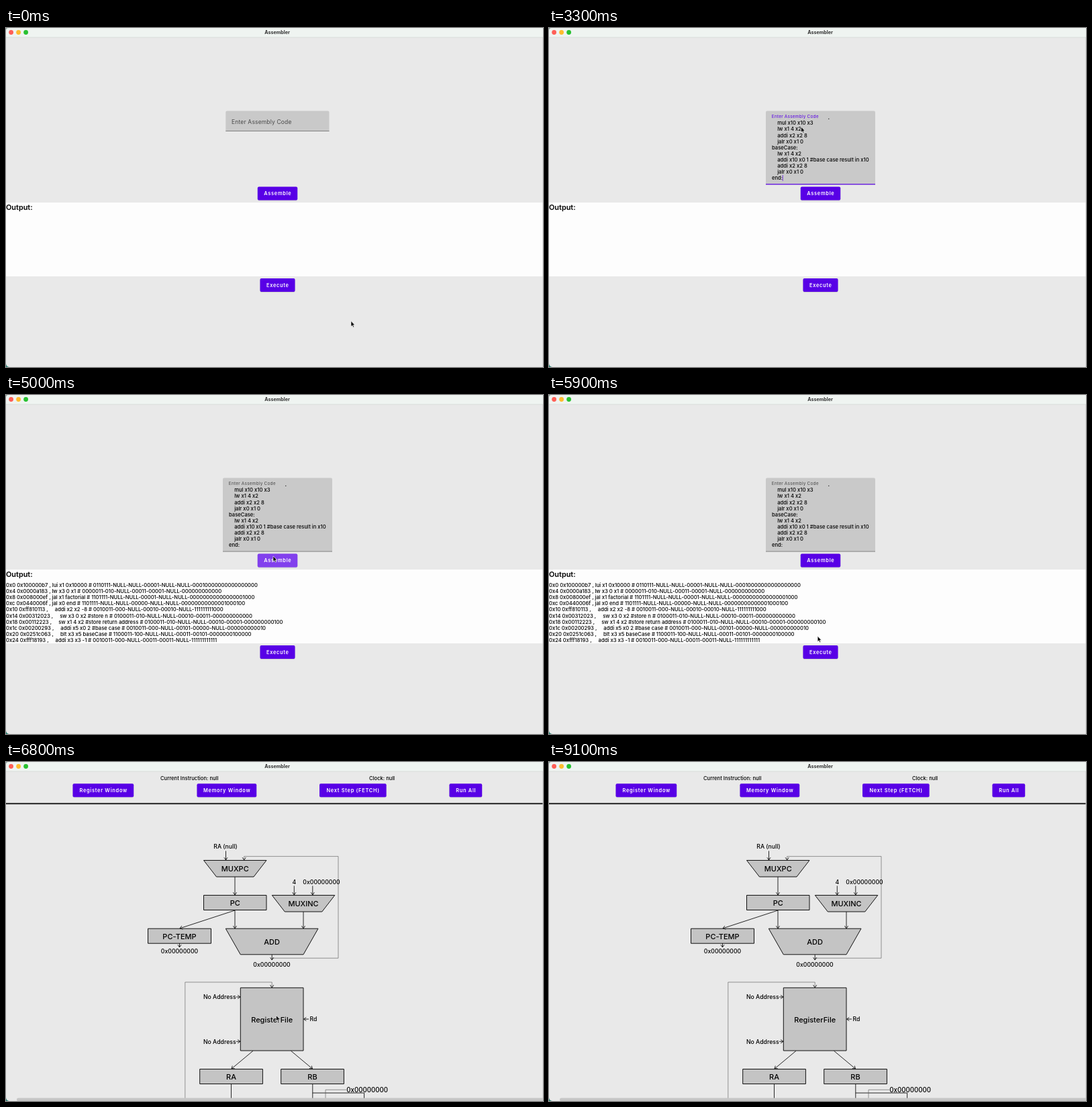
Animation, 800 px wide and 505 px high, one loop 9200 ms. Source, as an HTML page:

```html
<!DOCTYPE html>
<html lang="en">
<head>
<meta charset="utf-8">
<title>Assembler</title>
<style>
  html, body { margin: 0; width: 100%; height: 100%; overflow: hidden; background: #e9e9e9; }
  svg { display: block; width: 800px; height: 505px; }
  text { font-family: Inter, "Open Sans", sans-serif; font-weight: 500; white-space: pre; }
  .mid { text-anchor: middle; }
  .hint { font-weight: 400; }
  .button { font-size: 7.45px; font-weight: 600; letter-spacing: .7px; fill: #fff; }
  .block { fill: #c4c4c4; stroke: #111; stroke-width: 1; }
  .wire { fill: none; stroke: #111; stroke-width: .9; }
  .thin { stroke: #555; stroke-width: .6; }
</style>
</head>
<body>
<svg id="stage" viewBox="0 0 800 505">
  <defs>
    <clipPath id="panelClip"><rect y="260" width="800" height="110"/></clipPath>
    <filter id="shadow" x="-10%" y="-20%" width="120%" height="150%">
      <feDropShadow dx="0" dy=".6" stdDeviation=".7" flood-opacity=".2"/>
    </filter>
  </defs>
  <rect width="800" height="505" fill="#e9e9e9"/>
  <g id="editor"></g>
  <g id="machine"></g>
  <g id="chrome"></g>
  <path id="cursor" d="M0 0V8.1L1.9 6.4L3.2 9.3L4.5 8.7L3.3 5.9H5.7Z"
        fill="#000" stroke="#fff" stroke-width=".6" stroke-linejoin="round"/>
</svg>
<script>
const LOOP = 9200, FRAME = 100;
const PURPLE = '#5900e6';
const FOCUS_AT = 2300, PASTE_AT = 3300, ASSEMBLE_AT = 4700, EXECUTE_AT = 6430;
const $ = id => document.getElementById(id);

function add(parent, tag, attrs = {}, content) {
  const el = document.createElementNS('http://www.w3.org/2000/svg', tag);
  set(el, attrs);
  if (content !== undefined) el.textContent = content;
  parent.appendChild(el);
  return el;
}
function set(el, attrs) {
  for (const key in attrs) el.setAttribute(key, attrs[key]);
}
// Text whose capitals are centred on cy.
function label(parent, content, x, cy, attrs = {}, size = 7.66) {
  return add(parent, 'text', { x, y: cy + size * .36, style: `font-size:${size}px`, ...attrs }, content);
}
function button(parent, content, x, y, width) {
  const shape = { x, y, width, height: 20, rx: 2 };
  add(parent, 'rect', { ...shape, fill: PURPLE, filter: 'url(#shadow)' });
  const glow = add(parent, 'rect', { ...shape, fill: '#fff', opacity: 0 });
  add(parent, 'text', { x: x + width / 2 + .35, y: y + 12.7, class: 'mid button' }, content);
  return glow;
}

// Window frame
const chrome = $('chrome');
add(chrome, 'rect', { width: 800, height: 14, fill: '#eff4f1' });
add(chrome, 'rect', { y: 13.6, width: 800, height: .8, fill: '#d3d6d4' });
['#ff5f57', '#febc2e', '#28c131'].forEach((fill, i) =>
  add(chrome, 'circle', { cx: 7.6 + 11 * i, cy: 6.5, r: 3.4, fill }));
label(chrome, 'Assembler', 404, 6.3, { class: 'mid', style: 'font-size:7.15px;font-weight:700', fill: '#333' });
add(chrome, 'path', { d: 'M0 500Q.5 504.5 5 505H0Z', fill: '#2f8577' });
add(chrome, 'path', { d: 'M0 4Q0 0 4 0H0Z', fill: '#8fa9a2' });
add(chrome, 'rect', { x: 799.4, y: 14, width: .6, height: 491, fill: '#d2d2d2' });

// Editor screen
const editor = $('editor');
const box = add(editor, 'path', { fill: '#c9c9c9' });
const underline = add(editor, 'rect');
const fieldLabel = add(editor, 'text', { class: 'hint' }, 'Enter Assembly Code');
const code = add(editor, 'g');
`    mul x10 x10 x3
    lw x1 4 x2
    addi x2 x2 8
    jalr x0 x1 0
baseCase:
    lw x1 4 x2
    addi x10 x0 1 #base case result in x10
    addi x2 x2 8
    jalr x0 x1 0
end:`.split('\n').forEach((line, i) => label(code, line, 332, 141.6 + 9.1 * i));
add(code, 'rect', { x: 416.3, y: 134.8, width: 1, height: 1.2 });
const caret = add(editor, 'rect', { width: .7, height: 9, fill: PURPLE });

add(editor, 'rect', { y: 260, width: 800, height: 110, fill: '#fdfdfd' });
label(editor, 'Output:', 0, 266.6, { style: 'font-size:10.9px;font-weight:600' }, 11);
const output = add(editor, 'g', { 'clip-path': 'url(#panelClip)' });
`0x0 0x100000b7 , lui x1 0x10000 # 0110111-NULL-NULL-00001-NULL-NULL-00010000000000000000
0x4 0x0000a183 , lw x3 0 x1 # 0000011-010-NULL-00011-00001-NULL-000000000000
0x8 0x008000ef , jal x1 factorial # 1101111-NULL-NULL-00001-NULL-NULL-00000000000000001000
0xc 0x0440006f , jal x0 end # 1101111-NULL-NULL-00000-NULL-NULL-00000000000001000100
0x10 0xff810113 ,     addi x2 x2 -8 # 0010011-000-NULL-00010-00010-NULL-111111111000
0x14 0x00312023 ,     sw x3 0 x2 #store n # 0100011-010-NULL-NULL-00010-00011-000000000000
0x18 0x00112223 ,     sw x1 4 x2 #store return address # 0100011-010-NULL-NULL-00010-00001-000000000100
0x1c 0x00200293 ,     addi x5 x0 2 #base case # 0010011-000-NULL-00101-00000-NULL-000000000010
0x20 0x0251c063 ,     blt x3 x5 baseCase # 1100011-100-NULL-NULL-00011-00101-0000000100000
0x24 0xfff18193 ,     addi x3 x3 -1 # 0010011-000-NULL-00011-00011-NULL-111111111111`
  .split('\n').forEach((line, i) => label(output, line, 0, 283.2 + 9.12 * i));
const assembleGlow = button(editor, 'Assemble', 374.8, 236.5, 59.4);
const executeGlow = button(editor, 'Execute', 378.5, 373.1, 52);

// Data path screen
const machine = $('machine');
label(machine, 'Current Instruction: null', 230, 24.5);
label(machine, 'Clock: null', 541, 24.5);
button(machine, 'Register Window', 99.5, 32.3, 90.7);
button(machine, 'Memory Window', 284.5, 32.3, 88.7);
button(machine, 'Next Step (FETCH)', 467, 32.3, 99.6);
button(machine, 'Run All', 660.5, 32.3, 48.7);
add(machine, 'rect', { y: 60.9, width: 800, height: 2.2, fill: '#333' });

function block(name, x, y, width, height, inset = 0) {
  add(machine, 'path', {
    class: 'block',
    d: `M${x} ${y}h${width}l${-inset} ${height}h${2 * inset - width}Z`
  });
  label(machine, name, x + width / 2, y + height / 2 + .7, { class: 'mid' }, 11);
}
function wire(points, { thin = false, head = true } = {}) {
  const cls = thin ? 'wire thin' : 'wire';
  add(machine, 'path', { class: cls, d: 'M' + points.map(p => p.join(' ')).join('L') });
  if (!head) return;
  const [[ax, ay], [bx, by]] = points.slice(-2);
  const angle = Math.atan2(by - ay, bx - ax);
  const barb = turn => `${bx - 4.6 * Math.cos(angle + turn)} ${by - 4.6 * Math.sin(angle + turn)}`;
  add(machine, 'path', { class: 'wire', d: `M${barb(.6)}L${bx} ${by}L${barb(-.6)}` });
}
block('MUXPC', 294.5, 146.5, 93.5, 24.5, 19);
block('PC', 294.5, 198.5, 93.5, 22);
block('MUXINC', 396.3, 198.5, 93.5, 24.5, 19);
block('PC-TEMP', 211.5, 248.2, 94, 22);
block('ADD', 327.3, 248.2, 137.7, 38.6, 22);
block('RegisterFile', 349.3, 336.3, 93.7, 93.7);
block('RA', 288.7, 457.5, 93.7, 22);
block('RB', 409.7, 457.5, 93.7, 22);

wire([[327.5, 132.5], [327.5, 146]]);
wire([[396, 292.2], [495, 292.2], [495, 140.6], [354.7, 140.6], [354.7, 146]], { thin: true });
wire([[341, 171], [341, 198]]);
wire([[429.3, 184.5], [429.3, 198]]);
wire([[456.8, 184.5], [456.8, 198]]);
wire([[443, 223], [443, 248]]);
wire([[341, 221], [341, 248]]);
wire([[341, 221], [259, 247.8]]);
wire([[258.5, 270], [258.5, 276]]);
wire([[396.2, 287], [396.2, 295]]);
wire([[266.8, 505], [266.8, 328], [396.2, 328], [396.2, 336]], { thin: true });
wire([[343, 350], [349, 350]]);
wire([[343, 416.3], [349, 416.3]]);
wire([[451, 383], [443.5, 383]]);
wire([[368, 430.3], [336, 457]]);
wire([[424.5, 430.3], [456.5, 457]]);
wire([[335.5, 480], [335.5, 505]], { head: false });
wire([[456.8, 480], [456.8, 506.5]]);
wire([[456.8, 493], [533.6, 493], [533.6, 505]], { head: false });
wire([[507, 488.3], [476, 488.3], [476, 506.5]], { thin: true });

[['RA (null)', 327, 126], ['4', 429.3, 178.5], ['0x00000000', 470, 178.5],
 ['0x00000000', 258.5, 282.3], ['0x00000000', 396, 301.7],
 ['No Address', 318.3, 350.3], ['No Address', 318.3, 416.5], ['Rd', 458, 383.3]]
  .forEach(([name, x, y]) => label(machine, name, x, y, { class: 'mid' }, 8.7));
label(machine, '0x00000000', 538.2, 488.3, { class: 'mid' }, 9.7);
add(machine, 'rect', { x: 16, y: 500.4, width: 800, height: 5, rx: 2.3, fill: '#c6c6c6' });

// Motion
const clamp = v => Math.min(1, Math.max(0, v));
const span = (t, from, to) => clamp((t - from) / (to - from));
const smooth = p => p * p * (3 - 2 * p);
const mix = (a, b, p) => a + (b - a) * p;

// Pointer stops: time, x, y
const stops = [
  [500, 514, 436.6], [2100, 375.6, 147.3], [3700, 375.6, 147.3], [4600, 398, 240],
  [5100, 398, 240], [6200, 400.6, 386], [6700, 400.6, 386], [7700, 469, 83.2],
  [8600, 600, 26], [9000, 650, -12]
];
function pointerAt(t) {
  const next = stops.findIndex(s => s[0] > t);
  if (next === 0) return stops[0].slice(1);
  if (next < 0) return stops[stops.length - 1].slice(1);
  const a = stops[next - 1], b = stops[next];
  const p = smooth(span(t, a[0], b[0]));
  return [mix(a[1], b[1], p), mix(a[2], b[2], p)];
}

function drawField(t) {
  const pasted = t >= PASTE_AT;
  const focused = t >= FOCUS_AT && t < ASSEMBLE_AT;
  const lift = smooth(span(t, FOCUS_AT - 50, FOCUS_AT + 150));
  const [x, width, bottom] = pasted ? [323, 163, 233.4] : [327.3, 154.2, 154];
  set(box, { d: `M${x} ${bottom}V125.4q0 -2 2 -2h${width - 4}q2 0 2 2V${bottom}Z` });
  const weight = focused ? 1.2 : .7;
  set(underline, { x, y: bottom - weight, width, height: weight, fill: focused ? PURPLE : '#666' });

  const size = mix(8.5, 6.5, lift);
  set(fieldLabel, {
    x: x + 8.8,
    y: mix(139.6, 131.8, lift) + size * .36,
    fill: focused ? PURPLE : '#4a4a4a',
    style: `font-size:${size}px;letter-spacing:${mix(.15, .2, lift)}px`
  });
  set(code, { visibility: pasted ? 'visible' : 'hidden' });

  const blinkOn = (t - FOCUS_AT) % 1000 < 500;
  set(caret, {
    x: pasted ? 347.8 : 336.2,
    y: pasted ? 219 : 138.5,
    visibility: focused && blinkOn ? 'visible' : 'hidden'
  });
}

function render(t) {
  drawField(t);
  set(output, { visibility: t >= ASSEMBLE_AT ? 'visible' : 'hidden' });
  set(assembleGlow, { opacity: .08 * span(t, 4400, 4500) * (1 - span(t, 5300, 5500))
    + .17 * span(t, ASSEMBLE_AT - 100, ASSEMBLE_AT + 100) * (1 - span(t, 5200, 5500)) });
  set(executeGlow, { opacity: .08 * span(t, 5900, 6000) + .17 * span(t, 6250, 6450) });

  // The editor holds on while the machine fades in over it.
  const fade = smooth(span(t, EXECUTE_AT, EXECUTE_AT + 260));
  set(editor, { opacity: 1 - fade * fade });
  set(machine, { opacity: fade });
  const [x, y] = pointerAt(t);
  set($('cursor'), { transform: `translate(${x} ${y})` });
}

const start = performance.now();
function tick() {
  const t = (performance.now() - start) % LOOP;
  render(Math.floor(t / FRAME) * FRAME);
  requestAnimationFrame(tick);
}
tick();
</script>
</body>
</html>
```
